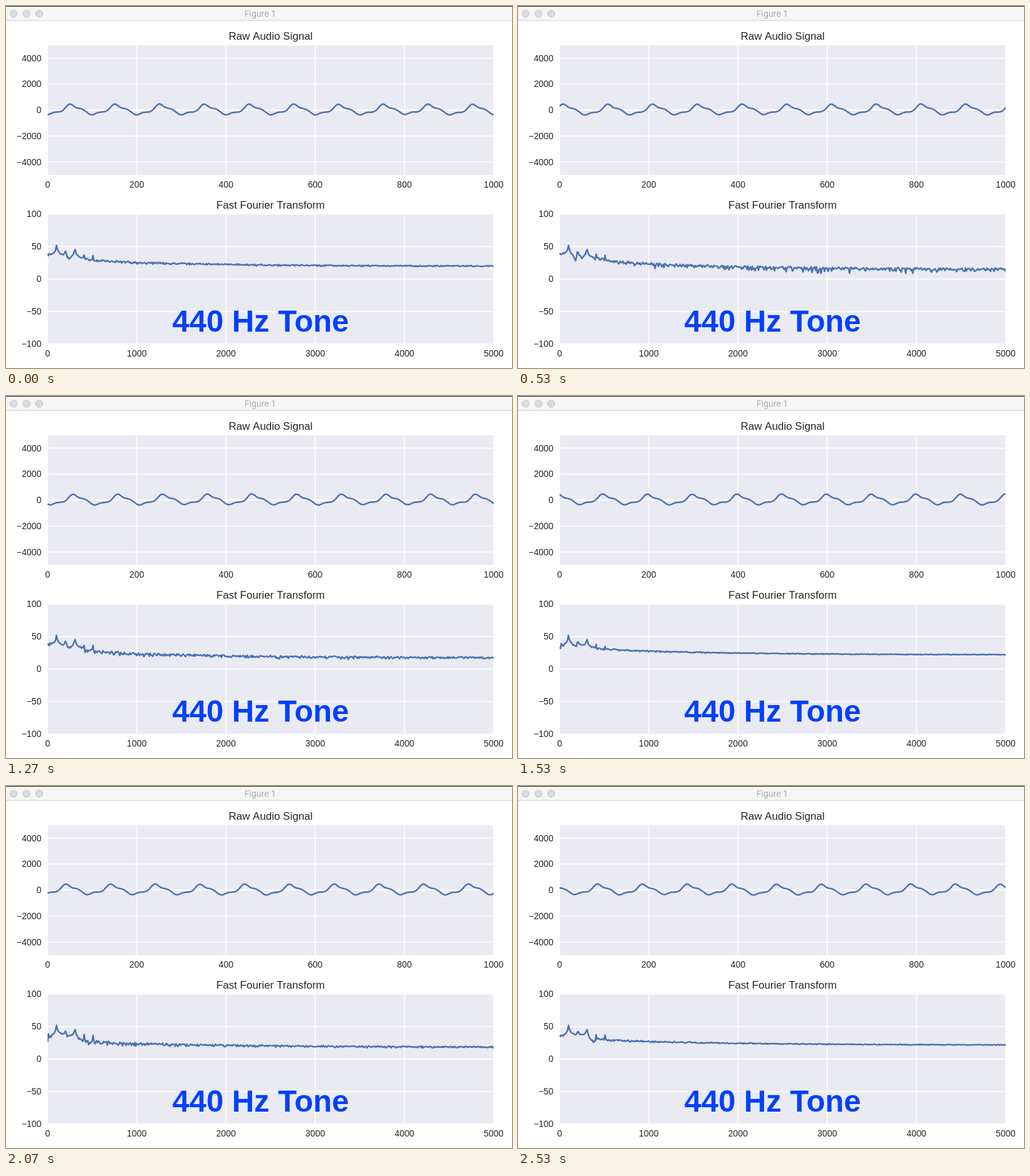
Write an HTML page with a canvas that moves like this. It is 792 by 568 pixels and loops after 2.6 s.

```html
<!DOCTYPE html>
<html lang="en">
<head>
<meta charset="utf-8">
<title>Audio spectrum</title>
<style>
  html, body { margin: 0; width: 100%; height: 100%; overflow: hidden; background: #fff; }
  canvas { display: block; }
</style>
</head>
<body>
<canvas id="stage" width="792" height="568"></canvas>
<script>
const ctx = document.getElementById('stage').getContext('2d');
const LOOP = 2600, SLOTS = 39, SAMPLES = 1024, TAU = 2 * Math.PI;
const CYCLES_PER_CHUNK = 10.217;
const LEFT = 65, WIDTH = 698.3, HEIGHT = 203.8;
const SANS = '"Liberation Sans", Arial, sans-serif';

const signalPlot = {
  title: 'Raw Audio Signal', top: 61.4, xMax: 1000, xStep: 200,
  yMax: 5000, yTicks: [4000, 2000, 0, -2000, -4000]
};
const spectrumPlot = {
  title: 'Fast Fourier Transform', top: 326.6, xMax: 5000, xStep: 1000,
  yMax: 100, yTicks: [100, 50, 0, -50, -100]
};

let seed = 7;
function noise() {
  seed = (Math.imul(seed, 1664525) + 1013904223) >>> 0;
  return seed / 2 ** 31 - 1;
}

// A 440 Hz tone with its overtones; p is measured in cycles.
function tone(p) {
  const partial = (amp, n, shift) => amp * Math.cos(TAU * (n * p - shift));
  return partial(335, 1, 0.071) + partial(45, 2, 0.143) + partial(85, 3, 0.021)
    + partial(12, 4, 0.1) + partial(8, 5, 0.1);
}

// Three audio chunks are read per redraw, apart from a few stalls.
function chunkAt(slot) {
  return 3 * slot + (slot >= 4) - 3 * (slot >= 17) - 3 * (slot >= 30) - 3 * (slot === 34);
}

const cosTable = Array.from({ length: SAMPLES }, (_, i) => Math.cos(TAU * i / SAMPLES));

function spectrum(samples) {
  const levels = [];
  for (let k = 0; k <= SAMPLES / 2; k++) {
    const hiss = 12 + 1.7e6 / (k + 20) ** 2;
    let re = noise() * hiss, im = k ? noise() * hiss : 0;
    for (let n = 0; n < SAMPLES; n++) {
      re += samples[n] * cosTable[k * n % SAMPLES];
      im += samples[n] * cosTable[(k * n + SAMPLES / 4) % SAMPLES];
    }
    levels.push(10 * Math.log10(Math.hypot(re, im)));
  }
  return levels;
}

const frames = Array.from({ length: SLOTS }, (_, slot) => {
  const start = -0.474 + chunkAt(slot) * CYCLES_PER_CHUNK;
  let drift = 0;
  const samples = Array.from({ length: SAMPLES }, (_, n) => {
    drift = drift * 0.97 + noise() * 4;
    return tone(start + n * CYCLES_PER_CHUNK / SAMPLES) + drift;
  });
  const clean = samples.map((_, n) => tone(start + n * CYCLES_PER_CHUNK / SAMPLES));
  return { samples, levels: spectrum(clean) };
});

function text(str, x, y, font, color, align = 'center') {
  ctx.font = font;
  ctx.fillStyle = color;
  ctx.textAlign = align;
  ctx.fillText(str, x, y);
}

function line(x1, y1, x2, y2) {
  ctx.beginPath();
  ctx.moveTo(x1, y1);
  ctx.lineTo(x2, y2);
  ctx.stroke();
}

function drawWindow() {
  ctx.fillStyle = '#fff';
  ctx.fillRect(0, 0, 792, 568);
  ctx.fillStyle = '#f6f6f6';
  ctx.fillRect(0, 0, 792, 22);
  ctx.fillStyle = '#d1d1d1';
  ctx.fillRect(0, 22, 792, 1);
  ctx.fillStyle = '#20282d';
  ctx.fillRect(0, 0, 792, 1);
  ctx.lineWidth = 1;
  ctx.strokeStyle = '#c6c6c6';
  ctx.fillStyle = '#dcdcdc';
  for (const x of [12, 32, 52]) {
    ctx.beginPath();
    ctx.arc(x, 12, 5.6, 0, TAU);
    ctx.fill();
    ctx.stroke();
  }
  text('Figure 1', 397, 17, '13px Inter, sans-serif', '#a8a8a8');
}

function drawPlot(plot, values, spacing) {
  const { top, xMax, xStep, yMax, yTicks } = plot;
  const px = v => LEFT + v / xMax * WIDTH;
  const py = v => top + (1 - v / yMax) * HEIGHT / 2;
  const tickFont = '13.89px ' + SANS, ink = '#262626';

  text(plot.title, LEFT + WIDTH / 2, top - 8.6, '16.67px ' + SANS, ink);
  ctx.save();
  ctx.beginPath();
  ctx.rect(LEFT, top, WIDTH, HEIGHT);
  ctx.clip();
  ctx.fillStyle = '#eaeaf2';
  ctx.fillRect(LEFT, top, WIDTH, HEIGHT);
  ctx.strokeStyle = '#fff';
  ctx.lineWidth = 1.4;
  for (let v = 0; v <= xMax; v += xStep) line(px(v), top, px(v), top + HEIGHT);
  for (const v of yTicks) line(LEFT, py(v), LEFT + WIDTH, py(v));

  ctx.strokeStyle = '#4c72b0';
  ctx.lineWidth = 2.43;
  ctx.lineJoin = 'round';
  ctx.beginPath();
  values.forEach((v, i) => ctx.lineTo(px(i * spacing), py(v)));
  ctx.stroke();
  ctx.restore();

  for (let v = 0; v <= xMax; v += xStep) text(v, px(v), top + HEIGHT + 19.8, tickFont, ink);
  for (const v of yTicks) text(String(v).replace('-', '\u2212'), 55.5, py(v) + 4.8, tickFont, ink, 'right');
}

function draw() {
  const t = Math.floor(performance.now() % LOOP / 10) * 10;
  const { samples, levels } = frames[Math.floor((t + 3.4) * SLOTS / LOOP)];
  drawWindow();
  drawPlot(signalPlot, samples, 1);
  drawPlot(spectrumPlot, levels, 10);
  text('440 Hz Tone', 398.5, 511, 'bold 48px ' + SANS, '#0040ff');
  requestAnimationFrame(draw);
}
draw();
</script>
</body>
</html>
```
